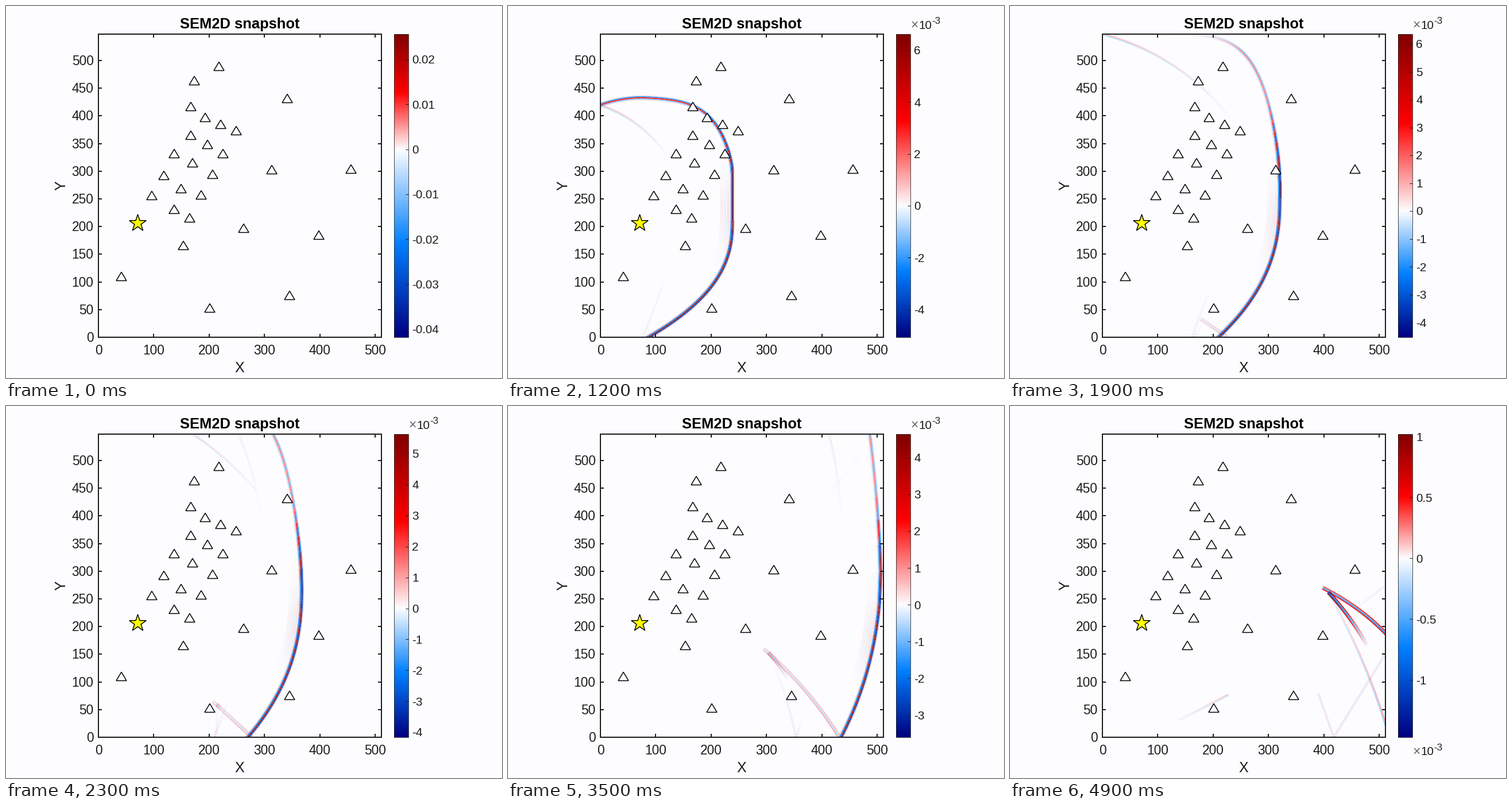
These frames come from a looping animation (864 px wide and 648 px high, 5000 ms). A matplotlib script:

```python
import math
import numpy as np
import matplotlib.pyplot as plt
from matplotlib.animation import FuncAnimation
from matplotlib.collections import LineCollection
from matplotlib.patches import Polygon, Rectangle

FRAMES, STEP_MS = 50, 100
LEFT, RIGHT, TOP, BOTTOM = 161, 653.5, 49, 577
UNIT = 0.964
STAR = np.array([229.5, 378.5])
BACK, INK = "#fdfdff", "#1c1c1c"
PX = 0.72  # points per pixel

plt.rcParams["font.family"] = "Liberation Sans"
fig = plt.figure(figsize=(8.64, 6.48), dpi=100, facecolor=BACK)
ax = fig.add_axes([0, 0, 1, 1])
ax.axis("off")


def label(x, y, text, size, color=INK, **kw):
    return ax.text(x, y, text, fontsize=size * PX, color=color, va="baseline", **kw)


def line(xs, ys):
    ax.plot(xs, ys, color=INK, lw=2 * PX, zorder=6, solid_capstyle="butt")


def box(x0, x1, **kw):
    return ax.add_patch(Rectangle((x0, TOP), x1 - x0, BOTTOM - TOP, fill=False, **kw))


# ---- static plot ----
for v in range(0, 501, 50):
    y = BOTTOM - v * UNIT
    label(152.5, y + 8, str(v), 22.8, ha="right")
    line([LEFT, LEFT + 6], [y, y])
    line([RIGHT - 6, RIGHT], [y, y])
for v in range(0, 501, 100):
    x = LEFT + v * UNIT
    label(x, 607, str(v), 22.8, ha="center")
    line([x, x], [BOTTOM, BOTTOM - 6])
    line([x, x], [TOP, TOP + 6])
label(407, 39, "SEM2D snapshot", 25.5, "black", ha="center", weight="bold")
label(407, 638.5, "X", 25, ha="center")
label(103, 313, "Y", 25, ha="center", rotation=90, rotation_mode="anchor")
box(LEFT, RIGHT, ec=INK, lw=2 * PX, zorder=6)
window = box(LEFT, RIGHT, ec="none")

STATIONS = [
    (371, 106), (328, 131), (490, 162), (322, 176), (347, 195), (374, 207),
    (401, 218), (322, 226), (351, 242), (293, 258), (378, 258), (325, 274),
    (275, 296), (360, 294), (463, 286), (601, 285), (305, 319), (254, 331),
    (340, 330), (293, 355), (320, 370), (414, 388), (545, 400), (309, 418),
    (201, 472), (494, 505), (355, 527)]
for x, y in STATIONS:
    ax.add_patch(Polygon([(x, y - 8.5), (x + 9, y + 6.5), (x - 9, y + 6.5)],
                         fc=BACK, ec="black", lw=1.5 * PX, zorder=7))
spikes = [STAR + (15.5 if i % 2 == 0 else 5.9)
          * np.array([math.sin(i * math.pi / 5), -math.cos(i * math.pi / 5)])
          for i in range(10)]
ax.add_patch(Polygon(spikes, fc="#ffff00", ec="black", lw=1.5 * PX, zorder=8))

# ---- main wavefront ----
HALF = 70        # samples above and below the shoulder
REACH = 12       # frame in which the front meets the floor
GROWTH = np.linspace(7, 0, HALF)


def ring(k):
    """Ellipse growing round the source, cut at the left wall."""
    rx, ry = 13.5 * (k + 0.2), 18.3 * (k + 0.2)
    end = math.pi - math.acos(min(1, (STAR[0] - LEFT) / rx))
    a = np.linspace(end, -end, 2 * HALF)
    return STAR + np.column_stack([rx * np.cos(a), -ry * np.sin(a)])


def sheet(k):
    """Front running right: log-shaped shoulder above, power-law sweep below."""
    age = k - REACH
    nose_x, nose_y = 391 + 11.3 * age, 375 - 5.6 * age
    crest, depth = 158 - 16 * age, 132 + 18.3 * age
    y = np.concatenate([crest + depth * np.exp(-GROWTH),
                        np.linspace(crest + depth, BOTTOM + 3, HALF)])
    g = np.log(np.maximum(depth / (y - crest), 1))
    sweep = 146 * (REACH / k) ** 0.68
    below = np.maximum(y - nose_y, 0) / (BOTTOM - nose_y)
    x = nose_x - 36 * g * g / (g + 0.25) - sweep * below ** 2.4
    y = y + 0.0022 * np.maximum(240 - x, 0) ** 2 * (g > 0)
    return np.column_stack([x, y]), g


def main_front(k):
    if k < REACH:
        mix = (k / REACH) ** 2
        target = sheet(REACH)[0]
        curve = ring(k) * (1 - mix) + target * mix
        floor, fade = 1 - 0.45 * mix, 1
    else:
        curve, g = sheet(k)
        floor = max(0.3, 0.55 - 0.035 * (k - REACH))
        fade = np.exp(-np.maximum(g - 2, 0) * (k - REACH) / 9)
    s = np.clip((curve[:, 1] - 150) / 170, 0, 1)
    return curve, (floor + (1 - floor) * s * s * (3 - 2 * s)) * fade


# ---- echoes: arcs whose two ends move at steady speeds ----
PAIR = [(-1.1, -0.9), (1.1, 0.9)]
DOUBLE = [(-2.2, 0.9), (-0.3, -0.65), (1.2, -0.3), (2.6, 0.7)]
STRONG = [(-4.4, 0.07), (-2.5, -0.45), (-0.5, 0.92), (1.5, -0.78), (3.3, 0.08)]
CODA = [(-7 - 2.4 * i, 0.07 * (-1) ** i * 0.88 ** i) for i in range(7)]

# first, last and reference frame, each end with its speed,
# bow and its change per frame, strength, gain at both ends, profile
ECHOES = [
    (6, 23, 12, (161, 173), (0, -17.7), (275, 258), (14.7, -10), 0.08, 0, 1.1, (1, 0.1), PAIR),
    (12, 40, 28, (421, 577), (11.6, 0), (438, 530), (10.4, 3), 0, 0, 0.3, (1, 0.3), PAIR),
    (22, 45, 35, (559, 49), (12.8, 0), (580, 210), (11, 0), 0.03, 0, 0.25, (1, 0), PAIR),
    (28, 49, 42, (540, 302), (8, 8), (647, 189), (5, 14.5), 0, 0, 0.06, (0.3, 1), PAIR),
    (38, 49, 42, (250, 480), (6.2, 9.7), (341, 436), (5.6, 9.6), 0, 0, 0.14, (0.2, 1), PAIR),
    (42, 49, 42, (641, 577), (-11, 0), (626, 522), (-12.7, -3), 0, 0, 0.07, (1, 1), PAIR),
    (42, 49, 42, (641, 577), (-11, 0), (656, 546), (0, -16.7), 0, 0, 0.07, (1, 1), PAIR),
    (16, 49, 42, (504, 377), (7.2, -7.5), (581, 577), (11.4, 0), 0.03, 0, 0.25, (0.2, 1), PAIR),
    (14, 49, 42, (495, 370), (7.1, -7.6), (664, 577), (12.4, 0), 0.077, 0.0055, 0.95, (0.6, 1),
     DOUBLE),
    (22, 49, 42, (504, 377), (7.2, -7.5), (556, 449), (9.6, -4.2), 0.03, 0, 1.3, (1, 0), DOUBLE)]


def arc(k, ref, start, v_start, end, v_end, bow):
    a = np.array(start) + (k - ref) * np.array(v_start)
    b = np.array(end) + (k - ref) * np.array(v_end)
    d = b - a
    control = (a + b) / 2 + 2 * bow * np.array([d[1], -d[0]])
    t = np.linspace(0, 1, 40)[:, None]
    return (1 - t) ** 2 * a + 2 * t * (1 - t) * control + t ** 2 * b


def waves(k, scale):
    for first, last, ref, a, va, b, vb, bow, bend, strength, gain, profile in ECHOES:
        if first <= k <= last:
            curve = arc(k, ref, a, va, b, vb, max(0, bow + bend * (k - ref)))
            yield curve, np.linspace(*gain, len(curve)) * strength / scale, profile
    curve, amp = main_front(k)
    if k > 8:
        trail = np.exp(-((curve[:, 1] - 345 - 1.6 * k) / 62) ** 2)
        yield curve, amp * trail * (curve[:, 0] > 330), CODA
    yield curve, amp, STRONG


def seismic(u):
    stops = [-1, -0.5, 0, 0.5, 1]
    ramps = [0, 0, 0.992, 1, 0.5], [0, 0.5, 0.992, 0, 0], [0.5, 1, 1, 0, 0]
    return np.stack([np.interp(u, stops, ramp) for ramp in ramps], -1)


def tinted(u):
    """Same ramp, with the pale half expressed as transparency."""
    rgb = seismic(np.where(u < 0, np.minimum(u, -0.5), np.maximum(u, 0.5)))
    return np.column_stack([rgb, np.clip(2 * np.abs(u), 0, 1)])


def strokes(k, scale):
    segments, colors = [], []
    for curve, amp, profile in waves(k, scale):
        tangent = np.gradient(curve, axis=0)
        tangent /= np.hypot(*tangent.T)[:, None] + 1e-9
        normal = np.column_stack([tangent[:, 1], -tangent[:, 0]])
        for offset, weight in profile:
            path = curve + normal * offset
            segments.append(np.stack([path[:-1], path[1:]], 1))
            colors.append(tinted(weight * (amp[:-1] + amp[1:]) / 2))
    return np.concatenate(segments), np.concatenate(colors)


field = LineCollection([], linewidths=1.7 * PX, zorder=3)
ax.add_collection(field, autolim=False)
field.set_clip_path(window)

# ---- colour bar: frame, upper and lower limit in thousandths ----
LIMITS = np.array([
    (0, 25.6, 41.8), (4, 10.5, 11), (12, 6.62, 5.07), (19, 6.35, 4.53), (28, 4.74, 3.71),
    (35, 4.64, 3.6), (40, 4.3, 3.4), (42, 1.247, 1.88), (49, 1.02, 1.47)])

bar = ax.imshow(np.zeros((256, 1, 3)), extent=(676, 701, BOTTOM, TOP),
                aspect="auto", interpolation="nearest", zorder=3)
ax.set(xlim=(0, 864), ylim=(648, 0))
box(676, 701, ec=INK, lw=0.8 * PX, zorder=4)
bar_ticks = LineCollection([], colors=INK, linewidths=PX, zorder=5)
ax.add_collection(bar_ticks, autolim=False)
bar_labels = [label(707.5, 0, "", 20.8) for _ in range(16)]
power = [label(701.5, 0, "×", 23, "#666666"), label(715.5, 0, "10", 20.6),
         label(738.5, 0, "-3", 17)]


def nice_step(span):
    raw = span / 11.3
    base = 10 ** math.floor(math.log10(raw))
    return next(m * base for m in (1, 2, 5, 10) if m * base >= raw)


def update(k):
    high, low = (np.interp(k, LIMITS[:, 0], LIMITS[:, i]) for i in (1, 2))
    segments, colors = strokes(k, high)
    field.set_segments(segments)
    field.set_color(colors)

    values = np.linspace(high, -low, 256)
    bar.set_data(seismic(np.where(values > 0, values / high, values / low))[:, None])

    scaled = max(high, low) < 10
    step = nice_step(high + low)
    ticks = [i * step for i in range(math.ceil(-low / step), int(high / step) + 1)]
    heights = [TOP + (high - v) / (high + low) * (BOTTOM - TOP) for v in ticks]
    bar_ticks.set_segments([[(695.5, y), (701, y)] for y in heights])
    for text in bar_labels:
        text.set_text("")
    for text, v, y in zip(bar_labels, ticks, heights):
        text.set_text(f"{v if scaled else v / 1000:g}")
        text.set_y(y + 7.3)

    base = 608.5 if low > high else 40
    for text, rise in zip(power, (0, 0, 9)):
        text.set_visible(scaled)
        text.set_y(base - rise)
    return []


anim = FuncAnimation(fig, update, frames=FRAMES, interval=STEP_MS,
                     init_func=lambda: update(0), repeat=True, repeat_delay=0, blit=False)
plt.show()
```
